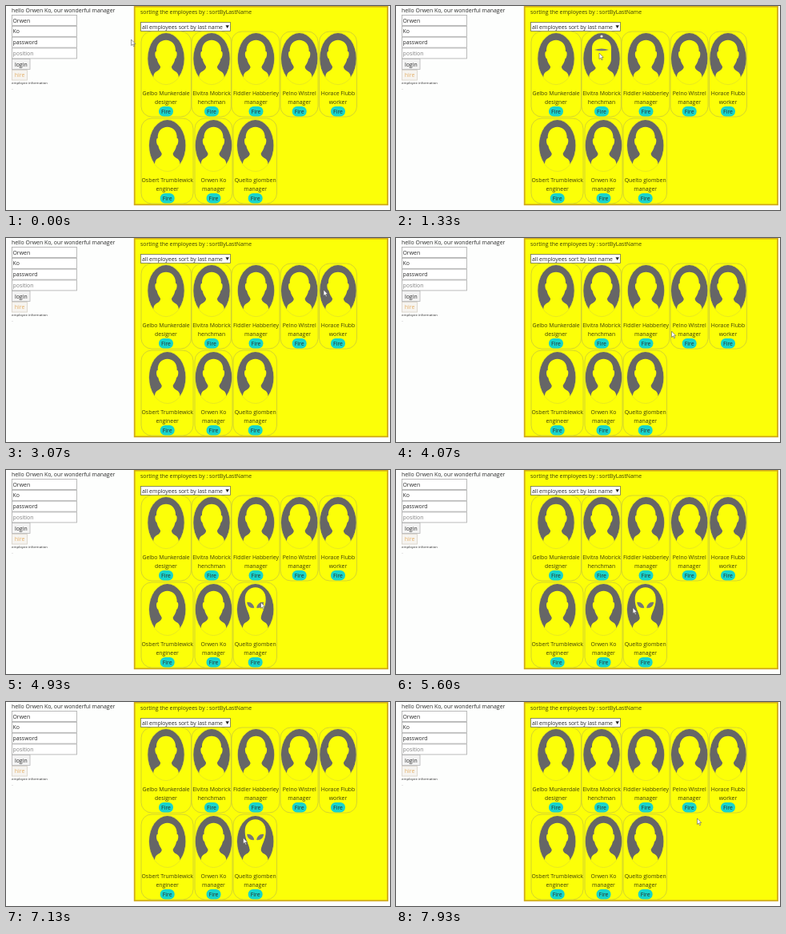
Recreate the animation shown at these times as an HTML page. Size 480 by 256 pixels, loop 8 s.

```html
<!DOCTYPE html>
<html>
<head>
<meta charset="utf-8">
<style>
html, body { margin: 0; width: 100%; height: 100%; overflow: hidden; background: #fdfefd; }
svg { display: block; width: 480px; height: 256px; }
text { font: 6.9px "Open Sans", "Noto Sans", sans-serif; fill: #2a2a2a; white-space: pre; }
.mid { text-anchor: middle; }
.yellow { fill: #fcff08; }
.olive { fill: #3c3c0a; }
.card { fill: none; stroke: #caca38; stroke-width: .8; }
</style>
</head>
<body>
<svg id="stage" viewBox="0 0 480 256">
  <defs>
    <g id="hair">
      <ellipse rx="22.8" ry="32" fill="#666"/>
      <path class="yellow" d="M-7 6V11C-8 16 -14 15 -15.5 21L-17 33H17L15.5 21C14 15 8 16 7 11V6Z"/>
      <ellipse rx="23.2" ry="32.6" fill="none" stroke="#d2d238" stroke-width=".5"/>
    </g>
    <path id="plain" class="yellow" d="M-12 -9C-13 -28 13 -28 12 -9C14.5 -10 14 -1 11.5 0C10.5 5 8 8 7 10H-7C-8 8 -10.5 5 -11.5 0C-14 -1 -14.5 -10 -12 -9Z"/>
    <g id="flat">
      <path class="yellow" d="M-12 -13C-12 -29 12 -29 12 -13V1C12 6 8 10 7 12H-7C-8 10 -12 6 -12 1Z"/>
      <path fill="#777" d="M-9 -11Q0 -14 9 -11Q0 -8.5 -9 -11Z"/>
      <circle cy="-28" r="1.6" fill="#f4f4e8"/>
    </g>
    <g id="alien">
      <path class="yellow" d="M-13 -12C-14 -33 14 -33 13 -12C13 -3 8 4 7 10H-7C-8 4 -13 -3 -13 -12Z"/>
      <path id="eye" fill="#777" d="M-10.5 -9C-6 -10 -2 -6 -1.5 -2C-6 -1 -10 -4 -10.5 -9Z"/>
      <use href="#eye" transform="scale(-1 1)"/>
    </g>
  </defs>
</svg>
<script>
const stage = document.getElementById('stage');

function add(tag, attrs, text) {
  const el = document.createElementNS('http://www.w3.org/2000/svg', tag);
  for (const k in attrs) el.setAttribute(k, attrs[k]);
  if (text) el.textContent = text;
  return stage.appendChild(el);
}
const box = (x, y, width, height, fill, stroke, rx = 0) =>
  add('rect', { x, y, width, height, fill, stroke, rx, 'stroke-width': .8 });
const label = (x, y, text, style = '') => add('text', { x, y, style }, text);
const center = (x, y, text, color = '') => add('text', { x, y, class: 'mid ' + color }, text);

// Login form
label(7, 8, 'hello Orwen Ko, our wonderful manager');
['Orwen', 'Ko', 'password', 'position'].forEach((text, i) => {
  const y = 11.5 + i * 13.8;
  box(7.5, y, 81, 13, '#fff', '#aaa');
  label(8.5, y + 9, text, i === 3 ? 'fill:#808080' : '');
});
box(7.5, 66.5, 22.5, 13, '#f3f3f3', '#b4b4b4');
center(18.8, 75.5, 'login');
box(7.5, 80.5, 19, 12.5, '#f6f4f0', '#d6d0c6');
center(17, 89.3, 'hire').style.fill = '#e4b06a';
label(7, 98.3, 'employee information', 'font-size:4.35px');
box(7.5, 104, 1, 1, '#ccc', 'none');

// Employee panel
add('rect', { class: 'yellow', x: 160.7, y: .7, width: 316.3, height: 248.6, stroke: '#d0aa1c', 'stroke-width': 1.8 });
label(168, 10, 'sorting the employees by : sortByLastName').classList.add('olive');
box(168.5, 20.5, 112, 11, '#fff', '#707050');
label(170, 28.6, 'all employees sort by last name');
add('path', { d: 'M274.5 24.2h4.4l-2.2 3.8z', fill: '#222' });

// name, job, centre x, card left, card width, row, face shown on hover
const people = [
  ['Gelbo Munkerdale', 'designer', 200, 169, 62.5, 0],
  ['Elvitra Mobrick', 'henchman', 257, 232, 49.5, 0, 'flat'],
  ['Fiddler Habberley', 'manager', 312.5, 282, 60, 0],
  ['Pelno Wistrel', 'manager', 366.7, 343, 47, 0],
  ['Horace Flubb', 'worker', 415, 391.5, 47, 0],
  ['Osbert Trumblewick', 'engineer', 201.7, 169, 65, 1, 'alien'],
  ['Orwen Ko', 'manager', 259.5, 236, 47, 1],
  ['Quelto glomben', 'manager', 311.7, 284, 54.5, 1, 'alien']
].map(([name, job, x, left, width, row, hover]) => {
  const top = 32 + row * 109, y = top + 34;
  add('rect', { class: 'card', x: left, y: top, width, height: 107, rx: 13 });
  const at = `translate(${x} ${y})`;
  add('use', { href: '#hair', transform: at });
  const face = add('use', { href: '#plain', transform: at });
  center(x, top + 79.5, name, 'olive');
  center(x, top + 90.5, job, 'olive');
  box(x - 9, top + 94, 18, 12.5, '#18d4cc', 'none', 6);
  center(x, top + 102.6, 'Fire');
  return { x, y, hover, face };
});

const arrow = add('path', {
  d: 'M0 0V7.6L1.8 6L3 8.8L4.2 8.3L3 5.6H5.3Z',
  fill: '#fff', stroke: '#555', 'stroke-width': .6
});

// Pointer stops: time, x, y
const stops = [
  [0, 156.5, 42], [70, 157, 42], [800, 215, 72], [1330, 254, 59], [1670, 254, 59],
  [2000, 262, 62], [2650, 443, 84], [3070, 397, 65], [3650, 418, 92],
  [4070, 344.5, 117], [4600, 322, 155], [4930, 318.5, 166], [5500, 306, 172],
  [6000, 212, 178], [6400, 201, 181], [6600, 204, 180], [7200, 300, 170], [7930, 376.5, 146], [8000, 376.5, 146]
];

function pointer(t) {
  const i = stops.findIndex(s => s[0] > t);
  const [t0, x0, y0] = stops[i - 1], [t1, x1, y1] = stops[i];
  const u = (t - t0) / (t1 - t0), k = u * u * (3 - 2 * u);
  return [x0 + (x1 - x0) * k, y0 + (y1 - y0) * k];
}

function draw(now) {
  const [x, y] = pointer(now % 8000);
  arrow.setAttribute('transform', `translate(${x} ${y})`);
  for (const p of people) {
    const inside = Math.hypot((x - p.x) / 23, (y - p.y) / 32) < 1;
    p.face.setAttribute('href', '#' + (inside && p.hover || 'plain'));
  }
  requestAnimationFrame(draw);
}
requestAnimationFrame(draw);
</script>
</body>
</html>
```
